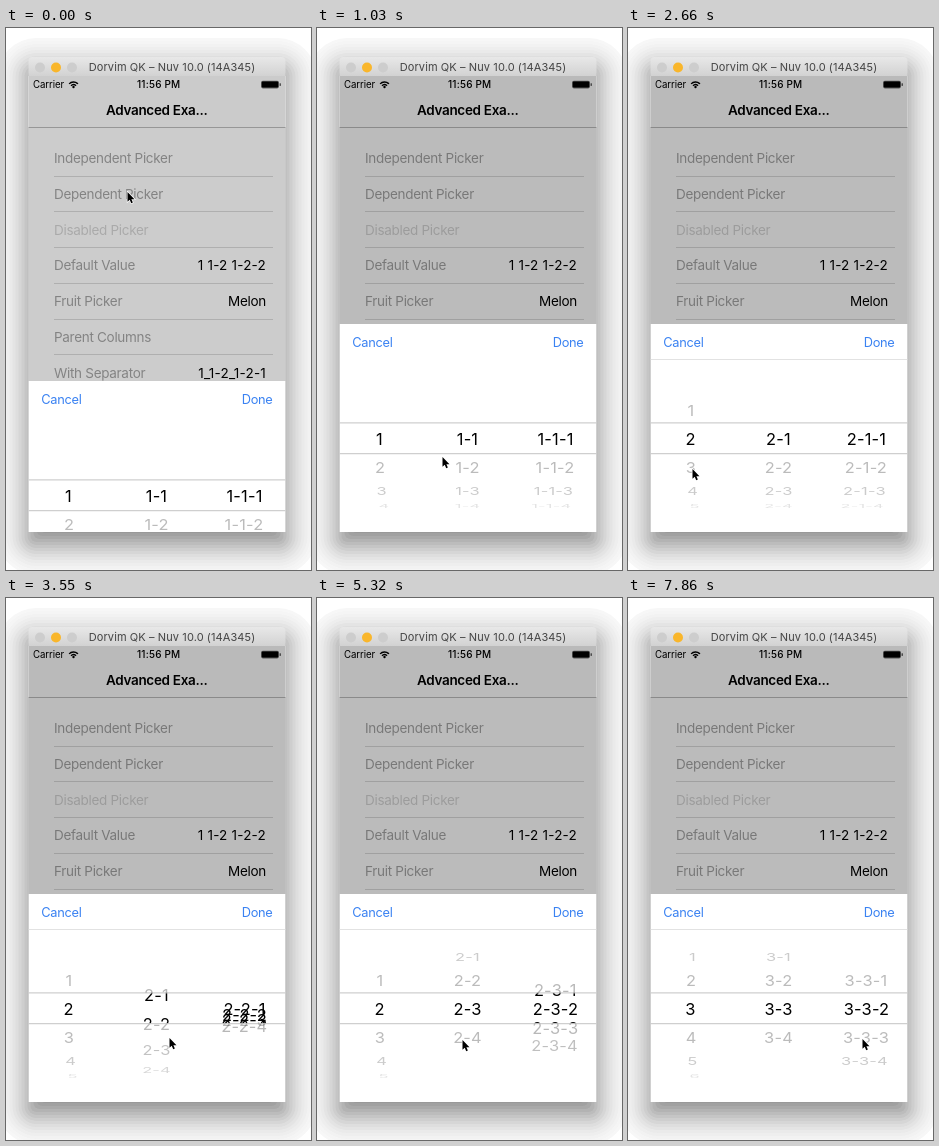
These frames come from a looping animation (305 by 542 pixels, 8 s). An HTML page with a canvas:

```html
<!DOCTYPE html>
<html>
<head>
<meta charset="utf-8">
<style>
  html, body { margin: 0; width: 100%; height: 100%; overflow: hidden; background: #fff; }
  canvas { display: block; width: 305px; height: 542px; }
</style>
</head>
<body>
<canvas id="stage"></canvas>
<script>
const W = 305, H = 542, LOOP = 8000, STEP = 148;
const LEFT = 22.5, RIGHT = 279.5, TOP = 29, BOTTOM = 504, WIDE = RIGHT - LEFT;
const canvas = document.getElementById('stage');
const c = canvas.getContext('2d');
const dpr = window.devicePixelRatio || 1;
canvas.width = W * dpr;
canvas.height = H * dpr;

// Steps at which each wheel is tapped and turns by one row.
const TAPS = [[15, 44], [24, 35], [29]];

// Pointer moves: start step, length in steps, end point.
const MOVES = [
  [3, 2, 134, 429], [6, 1, 125, 428], [7, 3, 188, 443], [10, 3, 64, 440],
  [19, 3, 163, 439], [25, 3, 220, 444], [31, 2, 132, 440], [33, 1, 145, 441],
  [38, 4, 58, 434], [47, 2, 120, 422], [49, 4, 234, 440]
];

const clamp = u => Math.max(0, Math.min(1, u));
const smooth = u => (u = clamp(u), u * u * (3 - 2 * u));
const passed = (s, taps) => taps.filter(t => t <= s).length;
const turn = (s, taps) => taps.reduce((sum, t) => sum + smooth((s - t + 1) / 2), 0);

// Reloaded rows fan out from the middle of the wheel.
function fan(s, taps) {
  const last = taps.filter(t => t <= s).pop();
  return last === undefined ? 1 : smooth((s - last + .83) / 3);
}

function rect(x, y, w, h, color) {
  c.fillStyle = color;
  c.fillRect(x, y, w, h);
}

function round(x, y, w, h, r, color) {
  c.fillStyle = color;
  c.beginPath();
  c.roundRect(x, y, w, h, r);
  c.fill();
}

const dot = (x, y, r, color) => round(x - r, y - r, 2 * r, 2 * r, r, color);

// y is the middle of the capitals; figures are set wider than words.
function text(str, x, y, size, color, { align = 'left', weight = 400, space = /^\d/.test(str) ? .2 : -.3 } = {}) {
  c.font = `${weight} ${size}px Inter, "Liberation Sans", sans-serif`;
  c.letterSpacing = space + 'px';
  c.textAlign = align;
  c.fillStyle = color;
  c.fillText(str, x, y + size * .36);
}

// Soft shadow in flat rings, lowered by 12 px.
function shadow() {
  for (let e = 31; e > -14; e -= 3) {
    const gray = 255 * (1 - .55 / (1 + Math.exp(e * .09)));
    round(LEFT - e, TOP + 12 - e, WIDE + 2 * e, BOTTOM - TOP + 2 * e, Math.max(6, e + 8),
      `rgb(${gray},${gray},${gray})`);
  }
}

function titleBar() {
  const bar = c.createLinearGradient(0, TOP, 0, 48);
  bar.addColorStop(0, '#e8e8e8');
  bar.addColorStop(1, '#d2d2d2');
  round(LEFT, TOP, WIDE, 19, [4, 4, 0, 0], bar);
  dot(34, 39.5, 5, '#cdcdcd');
  dot(50, 39.5, 5, '#f9b62b');
  dot(66, 39.5, 5, '#cdcdcd');
  text('Dorvim QK – Nuv 10.0 (14A345)', 166, 39.5, 11, '#444', { align: 'center', space: .1 });
}

function statusBar() {
  text('Carrier', 27, 56.5, 9.7, '#000', { space: -.1 });
  text('11:56 PM', 152.7, 56.5, 10, '#000', { align: 'center', weight: 500 });
  c.strokeStyle = '#000';
  c.lineWidth = 1.4;
  for (const r of [3.4, 6]) {
    c.beginPath();
    c.arc(67.5, 60, r, -Math.PI * .76, -Math.PI * .24);
    c.stroke();
  }
  dot(67.5, 59, 1.2, '#000');
  round(255, 52.8, 18, 7.6, 1.8, '#777');
  round(255.8, 53.6, 16.4, 6, 1, '#000');
  rect(273.6, 55.3, 1.2, 2.6, '#444');
}

function form(dim) {
  rect(LEFT, 48, WIDE, BOTTOM - 48, '#fff');
  rect(LEFT, 48, WIDE, 51, '#fdfdfd');
  rect(LEFT, 99, WIDE, 1, '#bcbcbc');
  statusBar();
  text('Advanced Exa...', 150.7, 82, 13.5, '#000', { align: 'center', weight: 600 });
  const rows = [
    ['Independent Picker'], ['Dependent Picker'], ['Disabled Picker'],
    ['Default Value', '1 1-2 1-2-2'], ['Fruit Picker', 'Melon'],
    ['Parent Columns'], ['With Separator', '1_1-2_1-2-1']
  ];
  rows.forEach(([label, value], i) => {
    const y = 130.5 + i * 35.7;
    text(label, 48, y, 13.5, i === 2 ? '#d4d4d4' : '#a4a4a4');
    if (value) text(value, 260, y, 13.5, '#000', { align: 'right' });
    rect(48, Math.round(y + 17.25), 219, 1, '#dadada');
  });
  rect(LEFT, 48, WIDE, BOTTOM - 48, `rgba(0,0,0,${dim})`);
}

function wheel(x, labels, pos, spread, mid) {
  const angle = .42, radius = 69.8, top = mid - 17, band = 31;
  const draw = inside => {
    c.save();
    c.beginPath();
    if (inside) {
      c.rect(LEFT, top, WIDE, band);
    } else {
      c.rect(LEFT, mid - 80, WIDE, 63);
      c.rect(LEFT, top + band, WIDE, 56);
    }
    c.clip();
    labels.forEach((label, i) => {
      const a = (i - pos) * angle * spread, depth = Math.cos(a);
      if (Math.abs(a) > 1.4) return;
      c.save();
      c.translate(150.5 + (x - 150.5) * (1 - .07 * (1 - depth)), mid + radius * Math.sin(a));
      c.scale(1, depth);
      text(label, 0, 0, 16.4, inside ? '#000' : `rgba(0,0,0,${.03 + .26 * depth})`, { align: 'center' });
      c.restore();
    });
    c.restore();
  };
  draw(false);
  draw(true);
}

function sheet(s, y) {
  const mid = y + 115.5, [first, second, third] = TAPS;
  const a = 1 + passed(s, first), b = 1 + passed(s, second);
  const four = [1, 2, 3, 4];
  c.save();
  c.beginPath();
  c.rect(LEFT, y, WIDE, BOTTOM - y);
  c.clip();
  rect(LEFT, y, WIDE, BOTTOM - y, '#fff');
  text('Cancel', 35.3, y + 18.5, 12.8, '#3a82f2');
  text('Done', 266.5, y + 18.5, 12.8, '#3a82f2', { align: 'right' });
  if (a > 1) rect(LEFT, y + 35, WIDE, 1, '#e2e2e2');
  wheel(62.5, ['1', '2', '3', '4', '5', '6'], turn(s, first), 1, mid);
  wheel(150.5, four.map(n => `${a}-${n}`), turn(s, second), fan(s, first), mid);
  wheel(238.5, four.map(n => `${a}-${b}-${n}`), turn(s, third),
    Math.min(fan(s, first), fan(s, second)), mid);
  for (const line of [98.4, 129.2]) rect(LEFT, y + line, WIDE, 1, '#c4c4c4');
  c.restore();
}

function pointer(s) {
  let x = 121, y = 163;
  for (const [start, length, toX, toY] of MOVES) {
    const p = smooth((s - start) / length);
    x += (toX - x) * p;
    y += (toY - y) * p;
  }
  const arrow = new Path2D('M0 0V11.5L2.6 9.2L4.4 13.2L6.3 12.4L4.6 8.4H8.2Z');
  c.save();
  c.translate(x + .5, y + 1);
  c.scale(.85, .85);
  c.strokeStyle = '#fff';
  c.lineWidth = 1.6;
  c.stroke(arrow);
  c.fillStyle = '#000';
  c.fill(arrow);
  c.restore();
}

function frame(now) {
  const s = Math.min(53, Math.floor((now % LOOP + 10) / STEP));
  const open = 1 - (1 - clamp(s / 2)) ** 3;
  c.setTransform(dpr, 0, 0, dpr, 0, 0);
  rect(0, 0, W, H, '#fff');
  shadow();
  titleBar();
  form(.2 + .065 * open);
  sheet(s, Math.round(353 - 57 * open));
  pointer(s);
  requestAnimationFrame(frame);
}
requestAnimationFrame(frame);
</script>
</body>
</html>
```
